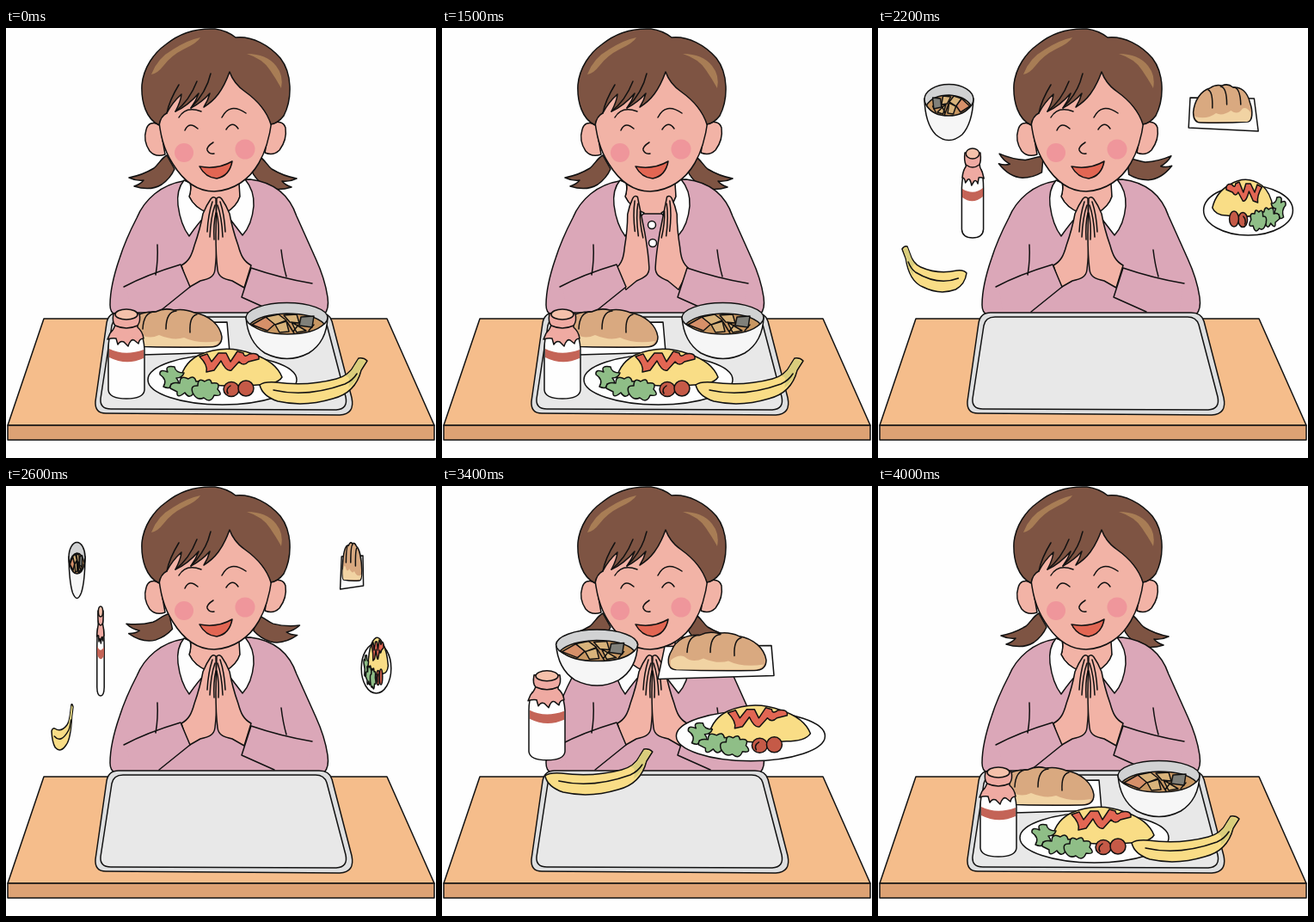
An HTML page for the animation above (5000 ms loop, 500 by 500 pixels).

```html
<!DOCTYPE html>
<html lang="en">
<head>
<meta charset="utf-8">
<title>Lunch time</title>
<style>
  html, body { margin: 0; width: 100%; height: 100%; overflow: hidden; background: #fefefe; }
  svg { display: block; width: 100vw; height: 100vh; }
  path, ellipse, circle { stroke: #111; stroke-width: 1.5; stroke-linejoin: round; stroke-linecap: round; vector-effect: non-scaling-stroke; }
  .line { fill: none; }
  .flat { stroke: none; }
  .skin { fill: #f2b3a6; }
  .hair { fill: #7e5443; }
  .knit { fill: #dba7b8; }
  .white { fill: #fefefe; }
  .pink { fill: #efaaa2; }
  .yellow { fill: #f9dd86; }
  .green { fill: #8fbe87; }
  .red { fill: #e26653; }
  .tomato { fill: #c55a47; }
  .tan { fill: #d8b37b; }
</style>
</head>
<body>
<svg viewBox="0 0 500 500">
  <defs>
    <path id="tail" class="hair" d="M187 148C180 152 178 158 172 163Q159 171 143 174Q151 178 160 177Q156 182 149 184Q168 190 181 182Q191 175 196 164Z"/>
    <g id="hand">
      <path class="skin" d="M204 276C213 271 216 264 219 253Q226 233 229 216Q233 206 238 199Q241 195 244 198L245 240Q245 265 243 281C242 290 235 292 226 294L212 302Z"/>
      <path class="line" d="M240 202Q235 217 234 237M243 206Q238 220 237 243M244 215Q241 228 242 246"/>
    </g>
  </defs>

  <g id="tailL"><use href="#tail"/></g>
  <g id="tailR"><use href="#tail" transform="matrix(-1 0 0 1 481 1)"/></g>

  <!-- body -->
  <path class="knit" d="M206 178C181 182 161 199 152 221Q139 246 132 268Q121 300 121 322Q121 331 127 333H370Q376 327 374 313Q371 292 360 268L338 219Q325 181 284 176Z"/>
  <path class="skin" d="M214 174Q216 187 213 196Q219 209 235 216H256Q270 207 272 196V174Z"/>
  <path class="white" d="M207 177Q198 188 200 206Q203 229 213 242Q224 226 235 215Q219 209 213 196Q216 187 214 180Z"/>
  <path class="white" d="M278 176Q289 189 288 207Q286 229 275 241Q265 228 255 215Q268 208 272 196L271 181Z"/>
  <circle class="white" cx="244" cy="229" r="4.5"/>
  <circle class="white" cx="245" cy="250" r="4.5"/>
  <g id="handL"><use href="#hand"/></g>
  <g id="handR"><use href="#hand" transform="matrix(-1 0 0 1 489 0)"/></g>
  <path class="knit flat" d="M140 300Q166 285 203 275L214 301L178 330H145Z"/>
  <path class="knit flat" d="M355 297Q320 290 285 279L274 313L312 330H350Z"/>
  <path class="line" d="M137 301Q163 287 203 275L214 301L178 330M176 252Q177 270 174 287M356 297Q320 291 285 279L274 313L312 330M320 258Q322 275 326 289"/>

  <!-- head -->
  <path class="skin" d="M179 112Q166 107 163 118Q159 131 167 143Q174 151 185 147ZM307 111Q322 106 325 116Q327 130 318 142Q311 149 301 145Z"/>
  <path class="skin" d="M177 100C179 123 183 141 194 158C207 179 224 190 242 190C265 189 283 176 294 157Q305 138 309 108L262 40L195 65Z"/>
  <path class="hair" d="M178 113C163 106 157 86 158 66C160 46 172 29 186 19C203 5 222 0 243 1Q257 3 267 11C286 9 306 20 319 35C333 53 333 82 323 102Q316 111 308 112C303 96 292 84 278 74Q265 65 260 51C252 73 243 84 230 92Q235 84 237 76Q227 87 215 93Q221 85 224 76Q211 91 197 97Q203 86 204 77Q193 87 187 99Q180 102 178 113Z"/>
  <path class="line" d="M238 53Q233 75 215 93M222 62Q213 85 197 97M201 66Q190 84 187 99"/>
  <path class="flat" fill="#a87d55" d="M169 54Q176 35 194 25Q211 14 226 11Q223 17 206 25Q192 32 183 44Q176 53 169 54ZM280 30Q299 36 307 49Q314 59 320 70Q323 55 314 44Q303 30 280 30Z"/>
  <circle class="flat" fill="#ef969b" cx="207" cy="145" r="11"/>
  <circle class="flat" fill="#ef969b" cx="278" cy="141" r="11.5"/>
  <path class="line" d="M201 104Q209 90 227 97M251 104Q260 86 279 99M208 119Q213 108 223 117M256 118Q263 107 270 117"/>
  <path id="nose" class="line" d="M241 133Q233 138 234 142Q236 147 242 146"/>
  <path class="red" d="M225 161Q246 165 263 155Q260 172 245 175Q232 174 225 161Z"/>

  <!-- table and tray -->
  <path fill="#f5bd8b" d="M44 338H443L498 462H2Z"/>
  <path fill="#dda274" d="M2 462H498V479H2Z"/>
  <path fill="#dedfe0" d="M131 331H364Q376 331 379 341L402 430Q406 449 388 450L116 448Q103 448 104 434L117 343Q119 331 131 331Z"/>
  <path fill="#e8e8e8" d="M136 336H360Q370 336 373 345L395 429Q398 443 384 444L122 443Q109 443 110 431L123 346Q125 336 136 336Z"/>

  <g id="bread">
    <path class="white" d="M133 343L257 342L260 377L125 381Z"/>
    <path fill="#d9a980" d="M145 370C136 369 135 358 141 348C146 335 159 329 174 330Q184 325 195 328Q208 326 219 331C237 334 249 346 251 359Q251 371 237 371Q190 372 145 370Z"/>
    <path class="flat" fill="#f1d3a3" d="M140 359Q149 352 156 355Q165 363 178 357Q195 364 207 360Q224 368 248 364Q245 370 236 370H147Q138 369 140 359Z"/>
    <path class="line" d="M173 330Q160 330 159 350M198 329Q186 330 186 350M222 333Q213 335 214 354"/>
  </g>

  <g id="milk">
    <path class="white" d="M123 352Q119 361 119 373V421Q120 431 140 431Q160 431 161 421V373Q160 360 156 352Z"/>
    <path class="flat" fill="#c46457" d="M120 373Q138 382 160 374V384Q140 393 120 383Z"/>
    <path class="pink" d="M127 343Q127 349 121 355L118 362Q124 360 128 361L130 368Q133 363 137 365L142 370Q145 361 149 363L154 367Q155 361 160 361Q159 353 153 348V342Z"/>
    <path class="pink" d="M125 332Q123 342 127 346Q140 352 153 346Q157 341 155 332Z"/>
    <ellipse cx="140" cy="333" rx="13" ry="6" fill="#f5c1ab"/>
  </g>

  <g id="bowl">
    <path fill="#f6f6f6" d="M279 336Q281 365 301 378Q327 391 352 378Q373 365 374 336Z"/>
    <ellipse cx="326.5" cy="337" rx="47.5" ry="17.5" fill="#d1d2d3"/>
    <path fill="#c89762" d="M284 344Q296 333 326 332Q358 332 370 344Q358 356 327 356Q297 356 284 344Z"/>
    <path fill="#d79069" d="M286 345L302 336L313 344L304 352Z"/>
    <path class="tan" d="M302 336L317 333L326 340L313 345ZM323 334L338 333L341 343L330 342ZM313 345L326 341L329 353L318 354ZM332 342L338 354L349 352Z"/>
    <path fill="#80807a" d="M343 336L358 335L356 348L341 346Z"/>
    <path class="line" d="M327 342L335 355M340 345L334 353M358 345L352 352"/>
  </g>

  <g id="plate">
    <ellipse class="white" cx="251.5" cy="409" rx="86.5" ry="29"/>
    <path class="yellow" d="M203 407Q208 388 225 380Q255 367 287 379Q314 388 321 406Q315 415 293 415Q244 420 203 407Z"/>
    <path class="red" d="M225 382L234 379L239 388L247 378L256 378L261 388L269 376L276 378Q277 384 283 379Q295 377 294 385L282 388Q276 394 271 388L262 398Q256 400 250 387L242 398L233 400Q235 392 225 382Z"/>
    <path class="green" d="M179 403Q178 396 188 400Q184 392 196 394Q197 401 207 401Q205 407 198 407Q205 416 192 414Q192 421 183 417Q188 409 179 403Z"/>
    <path class="green" d="M191 419Q190 411 202 413Q202 403 212 408Q219 403 221 411Q230 409 226 419Q230 429 218 425Q213 432 208 424Q198 432 199 423Z"/>
    <path class="green" d="M217 424Q214 415 223 416Q223 406 231 411Q238 406 239 413Q250 411 246 420Q254 429 242 427Q238 437 230 430Q222 434 217 424Z"/>
    <ellipse class="tomato" cx="262" cy="420" rx="9" ry="8.5"/>
    <circle class="tomato" cx="279" cy="419" r="9"/>
    <path class="line" d="M261 416Q255 420 258 425"/>
  </g>

  <g id="banana">
    <path class="yellow" d="M295 415Q300 411 314 412Q350 417 384 408Q399 404 405 392L410 384Q416 383 420 387L413 398C408 418 396 427 380 431Q347 441 316 434Q298 428 295 415Z"/>
    <path class="flat" fill="#d9cd7c" d="M410 385L418 387L412 398Q408 412 398 418Q402 404 394 405Q402 400 405 393Z"/>
    <path class="line" d="M311 421Q350 430 394 414Q403 410 408 402"/>
  </g>
</svg>
<script>
  const el = id => document.getElementById(id);
  const ramp = (step, from, to) => Math.min(1, Math.max(0, (step - from) / (to - from)));

  // spin axis and travel of each dish
  const dishes = {
    bread: { axis: 192, dx: 210, dy: -261 },
    milk: { axis: 140, dx: -30, dy: -187 },
    bowl: { axis: 326.5, dx: -244, dy: -254 },
    plate: { axis: 251.5, dx: 179, dy: -197 },
    banana: { axis: 357.5, dx: -292, dy: -130 }
  };

  const spinAround = (axis, scale) => `translate(${axis} 0) scale(${scale} 1) translate(${-axis} 0)`;
  const set = (id, transform) => el(id).setAttribute("transform", transform);

  function draw(now) {
    const step = Math.min(30, Math.max(0, Math.floor((now % 5000 - 1000) / 100)));
    const out = ramp(step, 5, 10);
    const turnBack = ramp(step, 10, 20);
    const away = out - ramp(step, 20, 30);
    const spin = (1 - 2 * out + 2 * turnBack) || 0.001;

    for (const [id, { axis, dx, dy }] of Object.entries(dishes))
      set(id, `translate(${dx * away} ${dy * away}) ${spinAround(axis, spin)}`);

    const open = 10 * (ramp(step, 0, 5) - out);
    set("handL", `rotate(${-open} 226 292)`);
    set("handR", `rotate(${open} 263 292)`);

    const lift = 43 * (out - turnBack);
    set("tailL", `rotate(${lift} 187 157)`);
    set("tailR", `rotate(${-lift} 297 157)`);

    set("nose", spinAround(240, Math.abs(1 - 2 * out)));
    requestAnimationFrame(draw);
  }
  requestAnimationFrame(draw);
</script>
</body>
</html>
```
